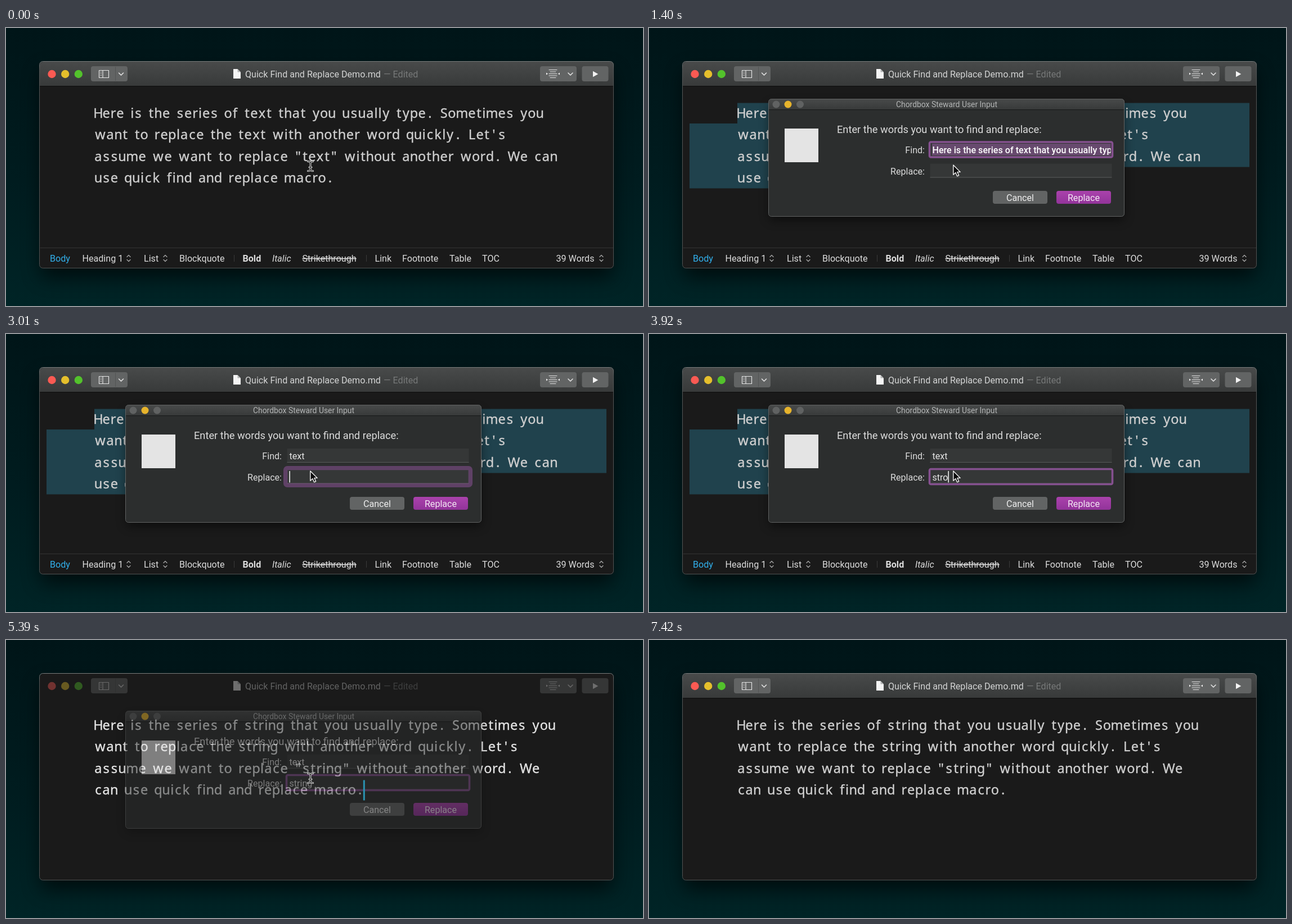
Animation of 1132 by 495 pixels, one loop 7.49 s. Source, as an HTML page:

```html
<!DOCTYPE html>
<html lang="en">
<head>
<meta charset="utf-8">
<title>Quick find and replace</title>
<style>
  html, body { margin: 0; width: 100%; height: 100%; overflow: hidden; background: #001a1c; }
  svg { display: block; width: 1132px; height: 495px; }
  text { font-family: Roboto, "Liberation Sans", sans-serif; font-size: 16.1px; fill: #dcdcdc; white-space: pre; }
  #prose { stroke-width: .35; }
  #prose text { font-family: "Noto Sans", "Open Sans", sans-serif; font-size: 23.5px; fill: inherit;
    text-anchor: middle; font-variant-ligatures: none; }
  .line { fill: none; stroke: #e4e4e4; stroke-width: 1.6; stroke-linecap: round; stroke-linejoin: round; }
  .button { fill: #626464; }
  .white { fill: #f4f4f4; }
  .end { text-anchor: end; }
  .mid { text-anchor: middle; }
</style>
</head>
<body>
<svg viewBox="0 0 1132 495" xmlns="http://www.w3.org/2000/svg">
  <defs>
    <linearGradient id="desk" x2="0" y2="1">
      <stop stop-color="#001518"/><stop offset=".55" stop-color="#001c1f"/><stop offset="1" stop-color="#002426"/>
    </linearGradient>
    <linearGradient id="chrome" x2="0" y2="1">
      <stop stop-color="#484a4a"/><stop offset="1" stop-color="#383a3a"/>
    </linearGradient>
    <linearGradient id="edge" x2="0" y2="1">
      <stop stop-color="#7a7c7c"/><stop offset=".04" stop-color="#555757"/><stop offset="1" stop-color="#505252"/>
    </linearGradient>
    <linearGradient id="purple" x2="0" y2="1">
      <stop stop-color="#aa42ac"/><stop offset="1" stop-color="#92349a"/>
    </linearGradient>
    <filter id="soft" x="-10%" y="-20%" width="120%" height="150%"><feGaussianBlur stdDeviation="17"/></filter>
    <filter id="softer" x="-10%" y="-20%" width="120%" height="150%"><feGaussianBlur stdDeviation="9"/></filter>
    <clipPath id="fieldClip"><rect x="500" y="200" width="320.5" height="70"/></clipPath>
    <path id="down" class="line" d="M-4 -2L0 2L4 -2"/>
    <path id="updown" class="line" style="stroke:#a8a8a8;stroke-width:1.3" d="M-3 -2.5L0 -5.5L3 -2.5M-3 2.5L0 5.5L3 2.5"/>
    <path id="beamShape" d="M536.5 237.5Q541 237.5 541 241Q541 237.5 545.5 237.5M541 241V251M539 248H543M536.5 254.5Q541 254.5 541 251Q541 254.5 545.5 254.5"/>
  </defs>

  <rect width="1132" height="495" fill="url(#desk)"/>
  <rect x="62" y="76" width="1016" height="368" rx="8" opacity=".62" filter="url(#soft)"/>
  <rect x="60" y="60" width="1020" height="368" rx="6" fill="#1a1a1a"/>

  <g id="titleBack">
    <path d="M60 103V66a6 6 0 0 1 6-6H1074a6 6 0 0 1 6 6V103Z" fill="url(#chrome)"/>
    <path d="M60 103.5H1080" stroke="#0c0c0c"/>
  </g>
  <g id="titleItems">
    <circle cx="81.5" cy="82" r="7.2" fill="#fb5a53"/>
    <circle cx="105.2" cy="82" r="7.2" fill="#e5bf2c"/>
    <circle cx="128.8" cy="82" r="7.2" fill="#53c22c"/>
    <rect class="button" x="151" y="68" width="65" height="27" rx="4"/>
    <path d="M194.5 69V94" stroke="#525454"/>
    <path class="line" style="stroke-width:1.2" d="M165.5 75.5H182.5V88.5H165.5ZM172 75.5V88.5"/>
    <path class="line" style="stroke-width:.8" d="M168 78.5H169.5M168 81.5H169.5M168 84.5H169.5"/>
    <use href="#down" x="204.5" y="82"/>
    <path class="white" d="M404 73H411.5L417 78.5V90H404Z"/>
    <path d="M411.5 73V78.5H417Z" fill="#b4b6b6"/>
    <text x="425" y="87.6" style="fill:#d4d5d5">Quick Find and Replace Demo.md</text>
    <text x="671" y="87.6" style="fill:#777979">— Edited</text>
    <rect class="button" x="949" y="68" width="65" height="27" rx="4"/>
    <path class="line" style="stroke-width:1" d="M965 74.5H979M967 78H977M965 81.5H979M965 85H979M967 88.5H977"/>
    <path class="white" d="M960 79.5L963 81.5L960 83.5ZM984 79.5L981 81.5L984 83.5Z"/>
    <use href="#down" x="1003" y="82"/>
    <rect class="button" x="1023.5" y="68" width="47" height="27" rx="4"/>
    <path class="white" d="M1043 76.8L1052.3 82L1043 87.2Z"/>
  </g>

  <path id="selection" fill="#20424d" d="M157 133.5H1067V247.5H583V285.5H72V170H157Z"/>
  <g id="prose"></g>

  <g id="footer">
    <path d="M60.5 391.5H1079.5" stroke="#343434"/>
    <path d="M405.5 404V416M640.5 404V416" stroke="#3a3a3a"/>
    <text x="78" y="415.6" style="fill:#31b0ec">Body</text>
    <text x="135.5" y="415.6">Heading 1</text><use href="#updown" x="218" y="410"/>
    <text x="245" y="415.6">List</text><use href="#updown" x="283" y="410"/>
    <text x="308" y="415.6">Blockquote</text>
    <text x="420.5" y="415.6" font-weight="700">Bold</text>
    <text x="473" y="415.6" font-style="italic">Italic</text>
    <text x="526.5" y="415.6" text-decoration="line-through">Strikethrough</text>
    <text x="655.5" y="415.6">Link</text>
    <text x="704" y="415.6">Footnote</text>
    <text x="788" y="415.6">Table</text>
    <text x="846" y="415.6">TOC</text>
    <text x="1045.5" y="415.6" class="end">39 Words</text><use href="#updown" x="1058" y="410"/>
  </g>
  <rect x="59.5" y="59.5" width="1020" height="368" rx="6" fill="none" stroke="url(#edge)"/>

  <g id="dialog">
    <rect x="214" y="136" width="630" height="206" rx="6" opacity=".5" filter="url(#softer)"/>
    <rect x="213" y="126.5" width="632" height="209" rx="5" fill="#2c2e2e"/>
    <path d="M213 145V131.5a5 5 0 0 1 5-5H840a5 5 0 0 1 5 5V145Z" fill="url(#chrome)"/>
    <path d="M213 145.5H845" stroke="#161818"/>
    <rect x="212.5" y="126.5" width="632" height="209" rx="5" fill="none" stroke="#606262"/>
    <circle cx="226" cy="136" r="6.5" fill="#606262"/>
    <circle cx="247" cy="136" r="6.5" fill="#e6b32c"/>
    <circle cx="268.5" cy="136" r="6.5" fill="#606262"/>
    <text x="529" y="140.6" class="mid" style="font-size:13.9px;fill:#b4b6b6">Chordbox Steward User Input</text>
    <rect x="241" y="179" width="60" height="60" fill="#e4e4e4"/>
    <text x="334" y="186.7" style="font-size:18.26px">Enter the words you want to find and replace:</text>
    <text x="490" y="223.2" class="end">Find:</text>
    <text x="490" y="260.8" class="end">Replace:</text>
    <g id="fields"></g>
    <rect class="button" x="611" y="290" width="97" height="23" rx="4"/>
    <text x="659.5" y="307.6" class="mid" style="fill:#eee">Cancel</text>
    <rect x="724" y="290" width="97" height="23" rx="4" fill="url(#purple)"/>
    <text x="772.5" y="307.6" class="mid" style="fill:#f4e8f4">Replace</text>
  </g>

  <rect id="bodyCaret" x="634.8" y="249.5" width="3" height="36" fill="#2a93b2"/>
  <path id="arrow" d="M540.8 244V261.2L544.9 257.5L547.6 263.8L550.6 262.5L547.9 256.4H553.2Z"
    fill="#0a0a0a" stroke="#f2f2f2" stroke-width="1.4" stroke-linejoin="round"/>
  <g id="beam" fill="none" stroke-linecap="round">
    <use href="#beamShape" stroke="#e6e6e6" stroke-width="3"/>
    <use href="#beamShape" stroke="#1c1c1c" stroke-width="1.2"/>
  </g>
</svg>
<script>
const LOOP = 7490, STEP = 70;
const NS = "http://www.w3.org/2000/svg";
const $ = id => document.getElementById(id);

function add(parent, tag, attrs) {
  const node = document.createElementNS(NS, tag);
  for (const key in attrs) node.setAttribute(key, attrs[key]);
  return parent.appendChild(node);
}
const show = (id, opacity) => $(id).setAttribute("opacity", opacity);
const ramp = (t, from, to) => Math.max(0, Math.min(1, (t - from) / (to - from)));
const within = (t, from, to) => t >= from && t < to;

// Four-width lettering: each glyph is centred in a cell of 2, 3, 4 or 6 units.
const UNIT = 3.551, PROSE_X = 156.8;
const cells = ch => /[il]/.test(ch) ? 2 : /[tfr ]/.test(ch) ? 3 : /[mwW]/.test(ch) ? 6 : 4;

function typeset(lines) {
  const group = add($("prose"), "g", {});
  lines.forEach((line, row) => {
    let pos = 0;
    const xs = [...line].map(ch => {
      const width = cells(ch);
      pos += width;
      return (PROSE_X + (pos - width / 2) * UNIT).toFixed(2);
    });
    add(group, "text", { x: xs.join(" "), y: 160 + row * 38.4 }).textContent = line;
  });
  return group;
}

const before = typeset([
  "Here is the series of text that you usually type. Sometimes you",
  "want to replace the text with another word quickly. Let's",
  "assume we want to replace \"text\" without another word. We can",
  "use quick find and replace macro."
]);
const after = typeset([
  "Here is the series of string that you usually type. Sometimes you",
  "want to replace the string with another word quickly. Let's",
  "assume we want to replace \"string\" without another word. We",
  "can use quick find and replace macro."
]);

function makeField(y) {
  const group = add($("fields"), "g", {});
  add(group, "rect", { x: 499.5, y, width: 323, height: 25, fill: "#353737" });
  add(group, "path", { d: `M499.5 ${y + 24.5}H822.5`, stroke: "#585a5a" });
  const ring = add(group, "rect", { fill: "none", stroke: "#85508f" });
  const mark = add(group, "rect", { x: 503, y: y + 2, width: 317.5, height: 21, fill: "#674a6e" });
  const label = add(group, "text", { x: 503.5, y: y + 19.2, "clip-path": "url(#fieldClip)" });
  const caret = add(group, "rect", { y: y + 2.5, width: 1.6, height: 20.5, fill: "#f0f0f0" });

  return (text, focus, selected, caretOn) => {
    const weight = 3.6 + (1 - focus) * 9, out = weight / 2 - 0.8;
    const box = { x: 499.5 - out, y: y - out, width: 323 + 2 * out, height: 25 + 2 * out,
      rx: 2 + out / 2, "stroke-width": weight, opacity: focus };
    for (const key in box) ring.setAttribute(key, box[key]);
    mark.setAttribute("opacity", selected ? 1 : 0);
    label.textContent = text;
    label.style.fill = selected ? "#fff" : "#e6e6e6";
    label.style.fontWeight = selected ? 500 : 400;
    caret.setAttribute("opacity", caretOn ? 1 : 0);
    caret.setAttribute("x", 503.3 + (text && !selected ? label.getComputedTextLength() : 0));
  };
}
const drawFind = makeField(204);
const drawReplace = makeField(241.5);

const LONG = "Here is the series of text that you usually type.";
const findKeys = [[0, LONG], [1820, "t"], [1960, "te"], [2170, "tex"], [2380, "text"]];
const replaceKeys = [[0, ""], [3500, "s"], [3640, "st"], [3780, "str"], [3850, "stro"],
  [4130, "str"], [4270, "stri"], [4410, "strin"], [4550, "string"]];
const typed = (keys, t) => keys.filter(key => key[0] <= t).pop()[1];

const SELECT = 140, OPEN = 770, TAB = 2870, DONE = 5180;

function render(t) {
  const replaced = t >= DONE;
  before.setAttribute("display", replaced ? "none" : "inline");
  after.setAttribute("display", replaced ? "inline" : "none");
  const ink = within(t, DONE, 5740) ? "#e6e6e6" : "#d0d0d0";
  $("prose").setAttribute("fill", ink);
  $("prose").setAttribute("stroke", ink);
  show("selection", within(t, SELECT, DONE) ? 1 : 0);

  const back = ramp(t, 6790, 7210);
  show("titleBack", Math.max(1 - ramp(t, 5110, 5350), back));
  show("titleItems", Math.max(1 - ramp(t, 5180, 5520), back));
  show("footer", 1 - ramp(t, 5110, 5350));

  show("dialog", Math.min(ramp(t, OPEN - STEP, OPEN + STEP), 1 - ramp(t, 5250, 5530)));
  const text = typed(findKeys, t), picked = text === LONG;
  drawFind(text, t < TAB ? ramp(t, 840, 1120) : 0, picked, !picked && t < TAB);
  drawReplace(typed(replaceKeys, t), ramp(t, TAB, TAB + 240), false, within(t, TAB, 5040));

  const blink = Math.min(ramp(t, 6440, 6580), 1 - ramp(t, 6970, 7110));
  show("bodyCaret", replaced ? Math.max(1 - ramp(t, 5870, 6020), blink) : 0);

  const dialogUp = within(t, OPEN, DONE);
  show("arrow", dialogUp ? 1 : 0);
  show("beam", !dialogUp && t < 6930 ? 1 : 0);
}

const start = performance.now();
function tick() {
  const t = (performance.now() - start) % LOOP;
  render(Math.floor(t / STEP) * STEP);
  requestAnimationFrame(tick);
}
render(0);
requestAnimationFrame(tick);
</script>
</body>
</html>
```
